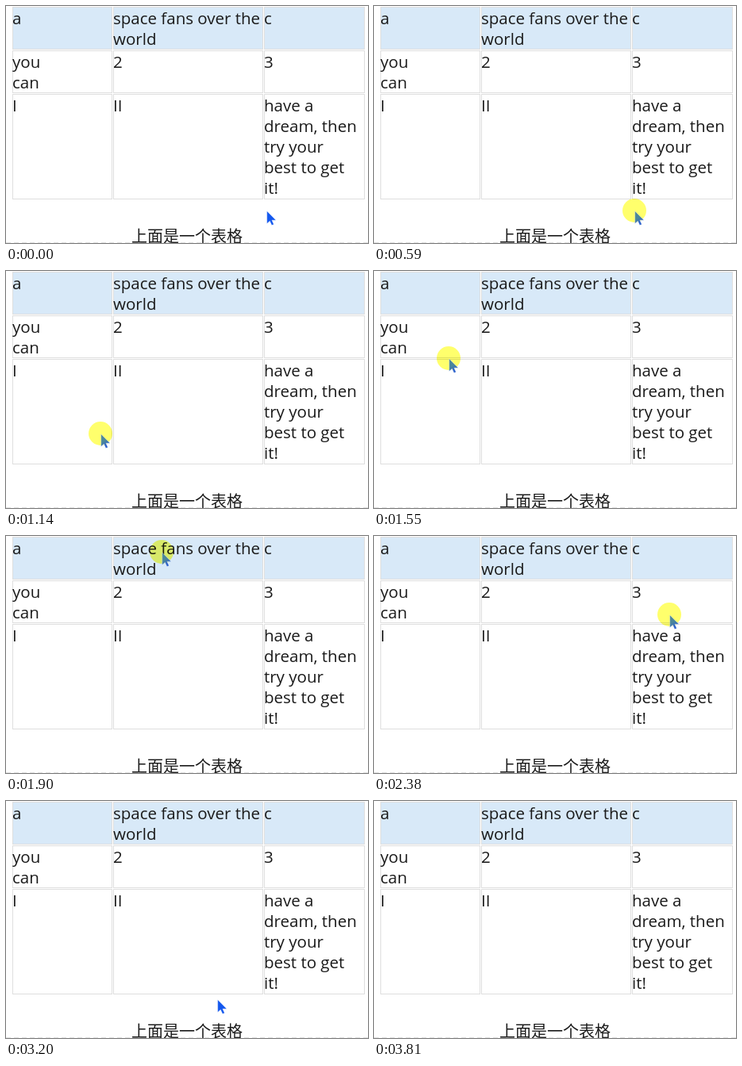
These frames come from a looping animation (456 px wide and 299 px high, 4.69 s). An HTML page:

```html
<!DOCTYPE html>
<html lang="zh-CN">
<head>
<meta charset="utf-8">
<style>
  html, body { margin: 0; width: 100%; height: 100%; overflow: hidden; background: #fff; }
  svg { display: block; width: 456px; height: 299px; }
  text { font: 20.5px "Open Sans", "Noto Sans", sans-serif; fill: #1a1a1a; white-space: pre; }
  .caption { font: 20px "Noto Sans CJK SC", "Noto Sans CJK", sans-serif; }
  #halo { mix-blend-mode: multiply; }
</style>
</head>
<body>
<svg id="stage" viewBox="0 0 456 299">
  <defs>
    <linearGradient id="tinted" x1="0" y1="0" x2="0.4" y2="1">
      <stop offset="0.55" stop-color="#4d8799"/>
      <stop offset="0.9" stop-color="#2b60cc"/>
    </linearGradient>
  </defs>
  <rect width="456" height="299" fill="#fff"/>
  <g id="table"></g>
  <path d="M0 298.5H456" stroke="#e2e2e2" stroke-dasharray="6 4"/>
  <text class="caption" x="158" y="298">上面是一个表格</text>
  <circle id="halo" r="15" fill="#ffff6c"/>
  <path id="arrow" d="M.7 .8V16.5L4.3 13.2L6.8 18.6L9.3 17.5L6.9 12.2H12Z" stroke="#fff" stroke-opacity=".5" stroke-width=".6"/>
</svg>
<script>
const LOOP = 4690;
const byId = id => document.getElementById(id);
const halo = byId('halo'), arrow = byId('arrow');

// Table: column and row edges, cell texts with one entry per line
const columns = [[8, 126], [135, 189], [325, 127]];
const rows = [
  { y: 1, h: 54, fill: '#d8e9f8', cells: [['a'], ['space fans over the', 'world'], ['c']] },
  { y: 56, h: 54, fill: '#fff', cells: [['you', 'can'], ['2'], ['3']] },
  { y: 111, h: 133, fill: '#fff', cells: [['I'], ['II'], ['have a', 'dream, then', 'try your', 'best to get', 'it!']] }
];

function add(tag, attributes, content = '') {
  const node = document.createElementNS('http://www.w3.org/2000/svg', tag);
  for (const name in attributes) node.setAttribute(name, attributes[name]);
  node.textContent = content;
  byId('table').append(node);
}

for (const { y, h, fill, cells } of rows) {
  cells.forEach((lines, c) => {
    const [x, w] = columns[c];
    add('rect', { x: x + .5, y: y + .5, width: w - 1, height: h - 1, fill, stroke: '#dedede' });
    lines.forEach((line, i) => add('text', { x, y: y + 22 + 26 * i }, line));
  });
}

// The pointer moves in ticks of 70 ms; a few ticks come 10 ms early
const START = 590, EARLY = [3, 16, 26, 33, 38, 42, 43];
const HALO_END = 38, LEAVE = 43, GONE = 47;
const tickTime = k => START + 70 * k - 10 * EARLY.filter(e => e <= k).length;

// Waypoints: tick, x, y
const tour = [
  [0, 328, 258], [1, 327, 258], [4, 230, 251], [7, 143, 222], [8, 119, 205],
  [12, 93, 127], [15, 108, 80], [17, 134, 48], [19, 196, 20], [21, 264, 22], [23, 319, 39],
  [26, 372, 99], [28, 374, 143], [31, 346, 200], [33, 298, 238], [35, 266, 250]
];
const exit = [[42, 266, 250], [43, 275, 256], [46, 356, 292]];

// Smooth curve through the waypoints, at rest at both ends
function along(path, k) {
  const last = path.length - 1;
  if (k <= path[0][0]) return path[0].slice(1);
  if (k >= path[last][0]) return path[last].slice(1);
  const i = path.findIndex(p => p[0] > k) - 1;
  const a = path[i], b = path[i + 1], span = b[0] - a[0], u = (k - a[0]) / span;
  const slope = (j, axis) => j === 0 || j === last ? 0 :
    (path[j + 1][axis] - path[j - 1][axis]) / (path[j + 1][0] - path[j - 1][0]);
  return [1, 2].map(axis =>
    a[axis] + (b[axis] - a[axis]) * u * u * (3 - 2 * u) +
    span * u * (1 - u) * (slope(i, axis) * (1 - u) - slope(i + 1, axis) * u));
}

function draw(now) {
  const time = now % LOOP;
  let tick = -1;
  while (tick < GONE && tickTime(tick + 1) <= time) tick++;

  const [x, y] = along(tick < LEAVE ? tour : exit, tick).map(Math.round);
  const lit = tick >= 0 && tick < HALO_END;
  for (const part of [halo, arrow]) part.setAttribute('transform', `translate(${x} ${y})`);
  halo.style.display = lit ? '' : 'none';
  arrow.style.display = tick < GONE ? '' : 'none';
  arrow.setAttribute('fill', lit ? 'url(#tinted)' : '#1458ee');
}

const begin = performance.now();
function frame() {
  draw(performance.now() - begin);
  requestAnimationFrame(frame);
}
frame();
</script>
</body>
</html>
```
